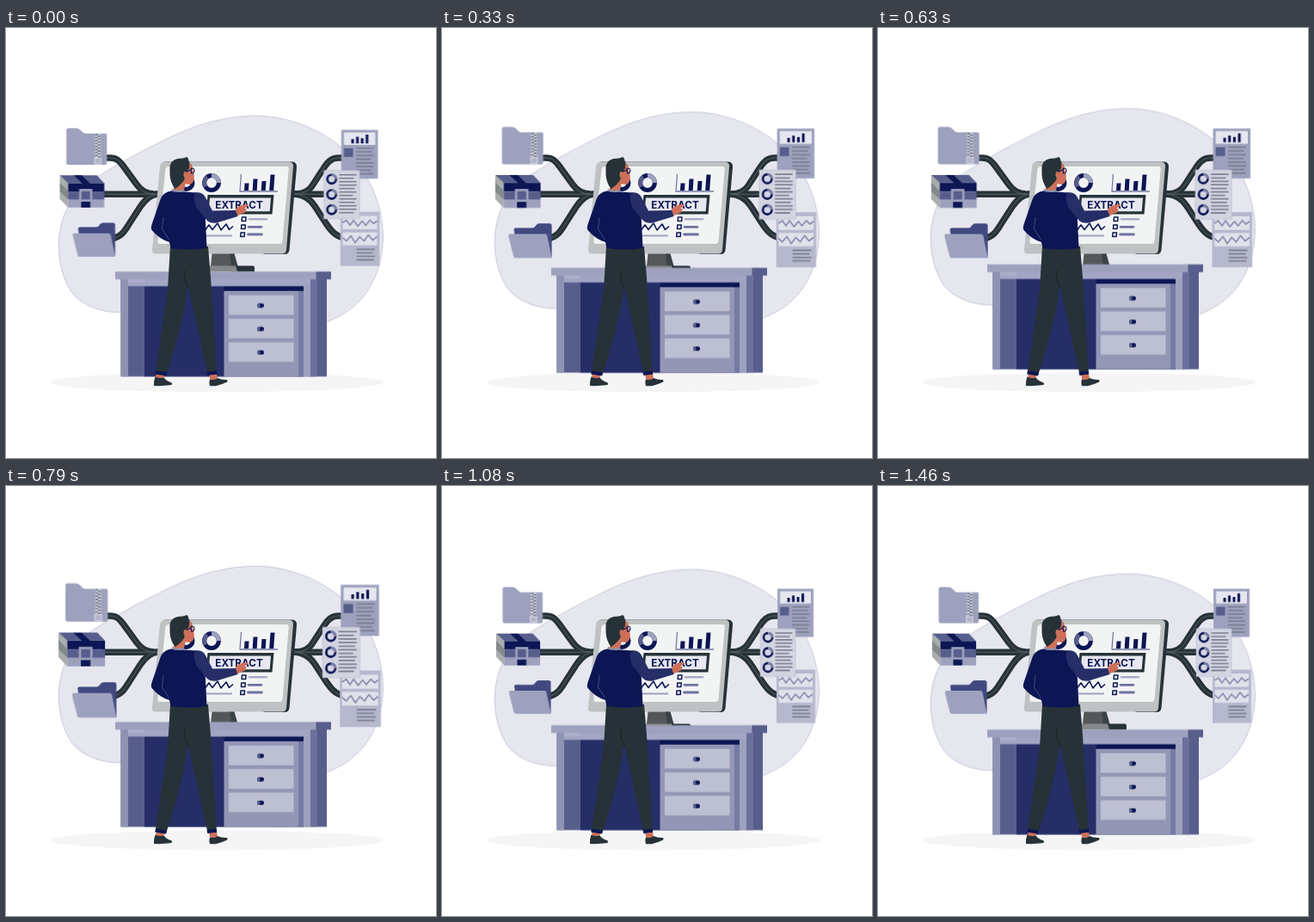
An HTML page for the animation above (1500 ms loop, 500 by 500 pixels).

```html
<!DOCTYPE html>
<html lang="en">
<head>
<meta charset="utf-8">
<title>Data extraction</title>
<style>
  :root {
    --navy: #0c1654; --deep: #262e68; --mid: #575e8c; --soft: #9da1be;
    --pale: #bdbfd3; --mist: #e5e6ee; --ink: #263238; --skin: #ce7059;
  }
  html, body { margin: 0; width: 100%; height: 100%; overflow: hidden; background: #fff; }
  svg { display: block; width: 100%; height: 100%; }
  .line { fill: none; stroke-linejoin: round; }
  .navy { fill: var(--navy); } .deep { fill: var(--deep); } .mid { fill: var(--mid); }
  .soft { fill: var(--soft); } .pale { fill: var(--pale); } .mist { fill: var(--mist); }
  .ink { fill: var(--ink); } .skin { fill: var(--skin); }
  .text { fill: none; stroke: #7b7f90; stroke-width: 1.6; }
</style>
</head>
<body>
<svg viewBox="0 0 500 500">
  <path class="float mist" stroke="#8f93b2" stroke-width=".4" d="M290 102.3C335 102 385 125 412 162C432 190 439 222 438.500 246C437 285 420 325 373 342C300 365 210 331 133 331C110 331 88 323 76 307C66 292 61 272 61.300 252C62 222 73 196 102 176C122 163 150 147 181 132C220 112 255 102.500 290 102.300Z"/>
  <ellipse cx="245.500" cy="412" rx="193.500" ry="11.500" fill="#f5f5f5"/>

  <g id="pipes" class="line"></g>

  <g id="monitor">
    <path class="ink" d="M184 155.500H333Q338.500 156 338 162L329.500 258Q329 263 324 263H300Z"/>
    <path fill="#bfc2c3" d="M185 155.500H329Q334.500 156 334 161L326 258Q325.500 262.500 321 262.500H174Q169.500 262.500 170 258L179 161Q180 155.500 185 155.500Z"/>
    <path fill="#f2f4f4" d="M190 161H326Q329 161 328.800 164L321.500 247.500Q321 251 318 251H179Q176 251 176.500 247.500L185.500 164Q186 161 190 161Z"/>
    <path fill="#55585a" d="M239.500 262.500H265.500L269.500 277H238Z"/>
    <path class="ink" d="M260 262.500H265.500L269.500 277H262Z" opacity=".55"/>
    <path class="ink" d="M262 276.500H287Q289 276.500 289 278.500V283.500H262Z"/>
    <path fill="#858789" d="M222 276.500H267L269 283.500H222Z"/>
    <g class="line" stroke-width="5">
      <circle cx="239" cy="180" r="8.400" stroke="#0c1654"/>
      <path stroke="#9da1be" d="M239 171.600A8.400 8.400 0 0 1 247.400 180"/>
      <path stroke="#575e8c" d="M232 184.500A8.400 8.400 0 0 1 234 173.200"/>
      <circle cx="209.500" cy="180" r="7.500" stroke="#0c1654"/>
    </g>
    <path class="line" stroke="#757aa2" stroke-width="1.300" d="M273.500 170L272 190H316"/>
    <path class="navy" d="M277.500 180.500h5l-.5 8.500h-5zM287.500 175.500h5l-.8 13.500h-5zM297.500 178h5l-.8 11h-5zM307.500 170.500h5l-1.300 18.500h-5z"/>
    <path class="ink" d="M234.500 194H311.500L309.500 216.500H232.500Z"/>
    <path fill="#e6e7ef" d="M237 197.500H308L306.700 213.300H235.700Z"/>
    <text class="navy" x="271" y="209.500" text-anchor="middle" font-family="Inter, sans-serif" font-weight="700" font-size="11.700">EXTRACT</text>
    <path class="line" stroke="#0c1654" stroke-width="1.600" d="M230 237L236 229L240 234.500L246 227L250 235L256 228L259.500 234.500L264 230.500"/>
    <path class="line" stroke="#9da1be" stroke-width="2" d="M230 241.500H263"/>
    <path class="line" stroke="#0c1654" stroke-width="1.500" d="M274.500 220h4.500l-.3 4.500h-4.500zM273.800 229h4.500l-.3 4.500h-4.500zM273 238h4.500l-.3 4.500h-4.500z"/>
    <path class="line" stroke="#a9acc6" stroke-width="2.500" stroke-linecap="round" d="M283 222.300H303"/>
    <path class="line" stroke="#6d739d" stroke-width="2.800" stroke-linecap="round" d="M282 231.300H297M281.500 240H297.500"/>
  </g>

  <g class="float" id="desk">
    <path class="mid" d="M133.500 292H373V405.500H133.500Z"/>
    <path fill="#8f93b3" d="M133.500 292H142V405.500H133.500Z"/>
    <path class="deep" d="M161 300H346V405.500H161Z"/>
    <path class="navy" d="M253.500 300H346V306H253.500Z"/>
    <path fill="#9496b5" d="M253.500 306H341V405.500H253.500Z"/>
    <path fill="#747aa4" d="M340 306H346V405.500H340Z"/>
    <path class="soft" d="M346 292H354V405.500H346Z"/>
    <path fill="#6a709b" d="M354 292H362V405.500H354Z"/>
    <path fill="#a2a6c4" d="M142 292H354V300.500H142Z"/>
    <path fill="#adb0cb" d="M142 292H161V296H142Z"/>
    <path fill="#9da1be" d="M127 283.500H361V292.500H127Z"/>
    <path class="mid" d="M360.500 283.500H378V292.500H360.500Z"/>
    <g id="drawers"></g>
  </g>

  <g class="beat" style="transform-origin:95px 191px">
    <path class="soft" d="M73 117.500H82Q85 117.500 87 120L89 122Q90.500 123.700 93 123.700H115.500Q117 123.700 117 125.500V157.500Q117 159.500 115 159.500H73Q70.500 159.500 70.500 157V120Q70.500 117.500 73 117.500Z"/>
    <path class="line" stroke="#d5d6e1" stroke-width="6.500" d="M106.500 124V152"/>
    <path class="line" stroke="#777b8d" stroke-width="3" stroke-dasharray="1.800 1.600" d="M105 124V152"/>
    <path class="line" stroke="#777b8d" stroke-width="3" stroke-dasharray="1.800 1.600" stroke-dashoffset="1.700" d="M108 124V152"/>
    <rect x="102.800" y="152" width="7.500" height="6.500" fill="#b4b6c9" stroke="#d5d6e1"/>

    <path fill="#a9adad" d="M63 171.500L72.500 180.500V208.500L63 198.500Z"/>
    <path fill="#848a8b" d="M63 180L72.500 189.500V199L63 190Z"/>
    <path class="mid" d="M63 171.500H105.500L114 180.500H72.500Z"/>
    <path class="navy" d="M79 171.500H88L97.500 180.500H88.500ZM72.500 180.500H114V190H72.500Z"/>
    <path class="mid" d="M72.500 190H114V199.500H72.500Z"/>
    <path class="soft" d="M72.500 199.500H114V208.500H72.500Z"/>
    <path class="navy" d="M87.500 190H98V208.500H87.500Z"/>
    <rect x="86.500" y="188.500" width="12.500" height="12" class="mid" stroke="#9da1be" stroke-width="2.600"/>

    <path fill="#414980" d="M84 233Q84 231 86 231H105Q107 231 108.500 228.500T112.500 226H124Q126.500 226 126.500 228.500V264L88 262Z"/>
    <path class="soft" d="M80 238H119Q121 238 121.500 240L126.500 265H86Q84 265 83.500 263L78 241Q77.500 238 80 238Z"/>
  </g>

  <g class="beat" style="transform-origin:402px 197px">
    <path class="soft" d="M390 119.500H432V175.500H390Z"/>
    <path class="mist" d="M393 122.500H429V136.800H393Z"/>
    <path class="navy" d="M401.500 130h3v5h-3zM407 127.500h3v7.500h-3zM412.500 129h3v6h-3zM418 125h3v10h-3z"/>
    <path class="mid" d="M393 140.500h10.500v10h-10.500z"/>
    <path class="text" data-rows="407 140.500 4.200 20 18 20 17 20 20 18 20"/>
    <path fill="#b6b8ce" d="M389 213.500H434V275.500H389Z"/>
    <path fill="#e0e1ea" d="M391.500 218H431V233.500H391.500ZM391.500 237H431V252H391.500Z"/>
    <path class="line" stroke="#878bad" stroke-width="1.600" d="M391.500 226L396 223L400 229L404 223L409 230L414 224L418 229L423 223L427 227L431 224M391.500 243L396 247L401 241L406 249L411 242L416 247L421 240L426 246L431 242"/>
    <path class="text" data-rows="407.500 256.500 4 21 19 21 20"/>
    <path fill="#d2d4e0" stroke="#b6b8ce" stroke-width=".5" d="M370 166H411V221.500H370Z"/>
    <g id="rings" class="line" stroke-width="2.600"></g>
    <path class="text" data-rows="387.500 171 3.950 20 17 20 20 18 20 16 20 18 20 20 17"/>
  </g>

  <g id="man">
    <path class="skin" d="M175 399H185L183 409L174 408ZM235 399H244.500L246 408L238 411Z"/>
    <path class="ink" d="M173.500 405.500Q178 408 183.500 406.500Q187 411 192.800 412.500V415Q182 416.500 172 416Q171.500 411 173.500 405.500ZM237 408.500Q243 410 246 407Q251 409.500 257.300 409V411.500Q250 415 244 416.300H237Q235.500 412 237 408.500Z"/>
    <path class="ink" d="M191 254H235L238 290L245 403H234.500L212 301L211 301Q206 345 186 404L173.500 402L188 304Z"/>
    <path class="navy" d="M174 398.500L187 400.500L186 404.500L173.500 402.500ZM233.500 400L244.800 398.500L245.200 402.500L234.300 404Z"/>
    <path class="line" stroke="#151e23" d="M207.500 282L208.500 295L212.500 303"/>
    <path class="skin" d="M198 177L206 167L208.500 182L206.500 191L194 190Z"/>
    <path class="skin" d="M206 160L216 158L218.700 172Q219.500 179 214.500 182L206 181Z"/>
    <path class="ink" d="M190.500 164Q190 154 199.500 152Q206 152 210.500 150Q212.500 152 212.500 154.500Q214.500 157 213 160.500Q213.500 164 210.500 166.500L209 171L207 177Q202.500 183.500 196.500 187Q191 180 190.500 170Z"/>
    <path class="skin" d="M206.500 171Q206.500 166 210 167Q212 169 210.500 174Q207.500 177 206.500 171Z"/>
    <path class="line" stroke="#0c1654" stroke-width="1.100" d="M209.500 167.500L215 165M215 163.500Q219 162 219 166Q218 170 215.500 169Z"/>
    <path fill="#8f93a8" d="M193 187Q200 190 207 187.500L206.500 192L192 190.500Z"/>
    <path class="navy" d="M192 189.500Q200 192 207 190.500L222 191.500Q230 194 231 205L233.500 256Q214 259.500 191.500 256L190 249Q179 246 169.500 235Q168 232 170 227L180 198Q183 191 192 189.500Z"/>
    <path class="line" stroke="#59608e" stroke-width=".7" d="M183 220L181.500 234L189.500 246"/>
    <path class="skin" d="M265 214Q268 208 274 206L281 205Q283 206 280 208L277 209.500Q281 210 279 212Q279 215 275 215.500L268 219Z"/>
    <path class="deep" d="M220 191.500Q229 190.500 232 197L240 212.500L267 212L269.500 219L245 226.500Q238 228 233 223L221.500 209Q217 198 220 191.500Z"/>
  </g>
</svg>
<script>
  const $ = s => document.querySelector(s);
  const all = s => document.querySelectorAll(s);

  // Rounded cables run from each icon into the monitor.
  const cables = [
    'M115 151H121C129 151 132 155 136 160L152 182C157 189 163 193 172 193',
    'M112 193.200H178',
    'M124 244.500C135 243 139 234 145 225L156 208C162 199 168 193.500 177 193',
    'M394 151H387C378 151 374 156 370 162L357 182C353 189 346 193 336 193',
    'M374 193.200H333',
    'M394 244C382 243 376 233 370 224L359 207C353 198 346 193.500 335 193'
  ];
  const strand = (color, width) =>
    cables.map(d => `<path d="${d}" stroke="${color}" stroke-width="${width}"/>`).join('');
  $('#pipes').innerHTML = strand('#263238', 7.5) + strand('#5b656a', 0.9);

  $('#drawers').innerHTML = [311, 338.3, 365.6].map(y => `
    <rect class="pale" x="259" y="${y}" width="75.500" height="22.800"/>
    <rect class="navy" x="292" y="${y + 9.4}" width="8" height="5" rx="2.300"/>
    <rect class="mid" x="292" y="${y + 9.4}" width="3.500" height="5" rx="1.700"/>`).join('');

  $('#rings').innerHTML = [176, 193.5, 211].map(y => `
    <circle cx="379" cy="${y}" r="5" stroke="#0c1654"/>
    <path d="M379 ${y - 5}a5 5 0 0 1 5 5" stroke="#7b80a8"/>`).join('');

  // data-rows: x, first y, step, then the length of each row
  all('[data-rows]').forEach(el => {
    const [x, y, step, ...rows] = el.dataset.rows.split(' ').map(Number);
    el.setAttribute('d', rows.map((w, i) => `M${x} ${y + i * step}h${w}`).join(''));
  });

  const play = (sel, frames) => all(sel).forEach(el =>
    el.animate(frames.map(([offset, transform]) => ({ offset, transform })),
      { duration: 1500, iterations: Infinity, delay: -20 }));

  play('.float', [[0, 'translateY(0px)'], [0.5, 'translateY(-10px)'], [1, 'translateY(0px)']]);
  play('.beat', [[0, 1], [0.1, 1.1], [0.3, 1], [0.4, 1], [0.5, 1.1], [0.6, 1], [1, 1]]
    .map(([t, s]) => [t, `scale(${s})`]));
</script>
</body>
</html>
```
